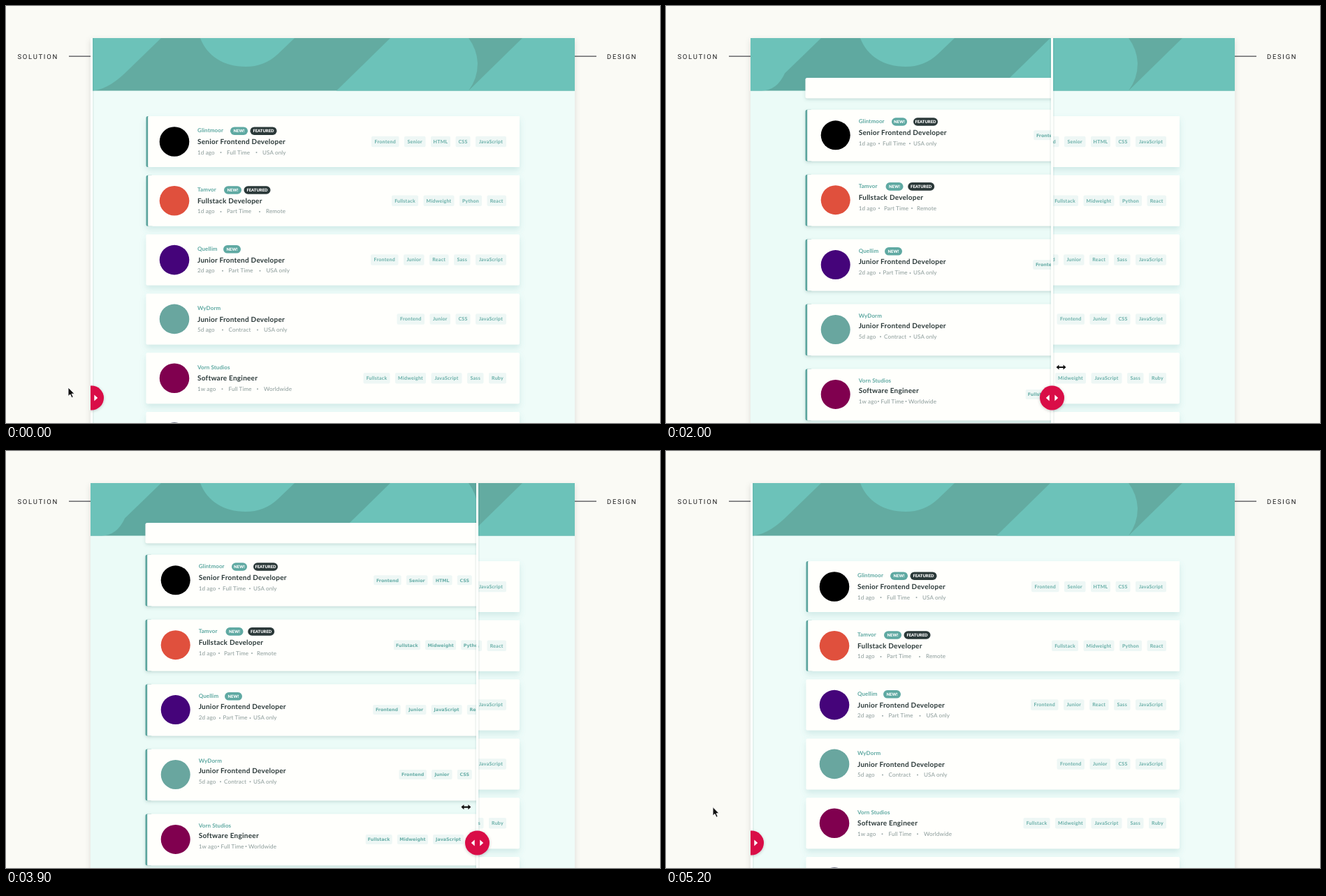
An HTML page for the animation above (6.2 s loop, 936 by 598 pixels).

```html
<!DOCTYPE html>
<html lang="en">
<head>
<meta charset="utf-8">
<title>Solution and design slider</title>
<style>
html, body { margin: 0; width: 100%; height: 100%; overflow: hidden; background: #fafaf5; }
svg { display: block; width: 936px; height: 598px; text-rendering: geometricPrecision; }
text { font-family: Lato, sans-serif; }
.label { font: 9.5px Roboto, sans-serif; letter-spacing: 1.7px; fill: #1d1d1f; }
.name { font-size: 8px; font-weight: 700; letter-spacing: .1px; fill: #5fa9a2; }
.title { font-size: 10px; font-weight: 700; letter-spacing: .25px; fill: #2b3939; }
.meta { font-size: 8.1px; letter-spacing: .12px; fill: #8a9a99; }
.badge { font-size: 5.9px; font-weight: 900; fill: #fff; text-anchor: middle; }
.tag { font-size: 7px; font-weight: 700; letter-spacing: .25px; fill: #68aea7; text-anchor: middle; }
.tag.sys, .clear { font: bold 6.3px "DejaVu Sans", sans-serif; letter-spacing: 0; }
.clear { fill: #7b8383; }
</style>
</head>
<body>
<svg viewBox="0 0 936 598">
  <defs>
    <clipPath id="stage"><rect x="121" y="46" width="693" height="552"/></clipPath>
    <clipPath id="right"><rect id="cut" y="46" width="936" height="552"/></clipPath>
    <filter id="soft" x="-10%" y="-20%" width="120%" height="160%">
      <feDropShadow dx="0" dy="5" stdDeviation="4" flood-color="#5ba4a4" flood-opacity=".2"/>
    </filter>
    <filter id="tight" x="-10%" y="-20%" width="120%" height="160%">
      <feDropShadow dx="0" dy="2" stdDeviation="2" flood-color="#4d7f7c" flood-opacity=".25"/>
    </filter>
    <filter id="halo" x="-20%" y="-20%" width="140%" height="140%">
      <feDropShadow dx="0" dy="1" stdDeviation="2" flood-color="#000" flood-opacity=".22"/>
    </filter>
    <filter id="frame" x="-5%" y="-5%" width="110%" height="110%">
      <feDropShadow dx="0" dy="3" stdDeviation="4" flood-color="#000" flood-opacity=".12"/>
    </filter>
  </defs>
  <rect width="936" height="598" fill="#fafaf5"/>
  <text class="label" x="16.5" y="75.6">SOLUTION</text>
  <text class="label" x="860" y="75.6">DESIGN</text>
  <path d="M90 72.2H121M814 72.2H845" stroke="#4a4a50" stroke-width="1.2"/>
  <rect x="121" y="46" width="693" height="570" fill="#eefbf8" filter="url(#frame)"/>
  <g clip-path="url(#stage)">
    <g id="solution"></g>
    <g clip-path="url(#right)"><g id="design"></g></g>
    <g id="slider">
      <rect x="-3.5" y="46" width="7" height="552" fill="#2c5a56" opacity=".06"/>
      <rect x="-1.5" y="46" width="3" height="552" fill="#fdfffc"/>
      <circle cy="562" r="17.5" fill="#d90d47" filter="url(#halo)"/>
      <path d="M-8.7 562L-3.8 557.4V566.6ZM8.7 562L3.8 557.4V566.6Z" fill="#fff"/>
    </g>
  </g>
  <g id="arrow">
    <path d="M0 0V12.6L2.9 10L5 14.8L7.2 13.8L5.1 9.2H9Z" fill="#111" stroke="#fff" stroke-width=".9" stroke-linejoin="round"/>
  </g>
  <g id="resize">
    <path d="M-7 0L-3 -3.6V-1.1H3V-3.6L7 0L3 3.6V1.1H-3V3.6Z" fill="#111" stroke="#fff" stroke-width=".8" stroke-linejoin="round" paint-order="stroke"/>
  </g>
</svg>
<script>
const $ = id => document.getElementById(id);
const TEAL = '#5fa9a2', DARK = '#2b3939';

const tagWidth = {
  Frontend: 39.5, Fullstack: 38, Senior: 30.5, Junior: 29.5, Midweight: 44, HTML: 28,
  CSS: 21, JavaScript: 44, Python: 32, React: 27.5, Sass: 23.5, Ruby: 25
};

// Meta x lists: dot, text, dot, text
const jobs = [
  { name: 'Glintmoor', title: 'Senior Frontend Developer', logo: '#000', badges: 2,
    meta: ['1d ago', 'Full Time', 'USA only'], tags: 'Frontend Senior HTML CSS JavaScript',
    design: { badge: 321, meta: [307.5, 316, 358.5, 367] },
    solution: { badge: 323, slim: 3, meta: [305, 310, 349, 354] } },
  { name: 'Tamvor', title: 'Fullstack Developer', logo: '#e0503d', badges: 2,
    meta: ['1d ago', 'Part Time', 'Remote'], tags: 'Fullstack Midweight Python React',
    design: { badge: 312, meta: [307.5, 316, 363, 372] },
    solution: { badge: 314.5, meta: [305, 312, 352, 359] } },
  { name: 'Quellim', title: 'Junior Frontend Developer', logo: '#45047a', badges: 1,
    meta: ['2d ago', 'Part Time', 'USA only'], tags: 'Frontend Junior React Sass JavaScript',
    design: { badge: 311, meta: [310, 318.5, 363.5, 372.5] },
    solution: { badge: 313, meta: [306, 310.5, 349.5, 354], tags: 'Frontend Junior JavaScript React Sass' } },
  { name: 'WyDorm', title: 'Junior Frontend Developer', logo: '#69a69f', badges: 0,
    meta: ['5d ago', 'Contract', 'USA only'], tags: 'Frontend Junior CSS JavaScript',
    design: { meta: [310, 318.5, 360, 369] },
    solution: { meta: [307, 312, 349.5, 354] } },
  { name: 'Vorn Studios', title: 'Software Engineer', logo: '#80004f', badges: 0,
    meta: ['1w ago', 'Full Time', 'Worldwide'], tags: 'Fullstack Midweight JavaScript Sass Ruby',
    design: { meta: [309.5, 318.5, 360, 369] },
    solution: { meta: [304, 307.5, 343.5, 347], tags: 'Fullstack Midweight JavaScript Ruby Sass' } }
];

const looks = {
  design: { x: 200.5, y: 158, step: 84.8, w: 534.5, h: 73, textX: 274, name: 23.4, title: 40.2, meta: 54.5,
    logoX: 241, r: 21.3, badgeY: 21.2, newW: 25, featW: 38, gap: 3.5, tagsEnd: 716, tagH: 15.5, tagGap: 7.5,
    shadow: 'soft', bars: 2, lift: 0, tagClass: 'tag' },
  solution: { x: 199.5, y: 148.8, step: 92.9, w: 536, h: 73.8, textX: 275.7, name: 19.6, title: 35.8, meta: 50.8,
    logoX: 242.7, r: 21, badgeY: 17.2, newW: 25, featW: 38, gap: 6.7, tagsEnd: 718, tagH: 14, tagGap: 7.2,
    shadow: 'tight', bars: 5, lift: 1.7, tagClass: 'tag sys' }
};

const rect = (x, y, w, h, fill, r = 0, more = '') =>
  `<rect x="${x}" y="${y}" width="${w}" height="${h}" rx="${r}" fill="${fill}" ${more}/>`;
const text = (cls, x, y, s) => `<text class="${cls}" x="${x}" y="${y}">${s}</text>`;
const disc = (x, y, r, fill) => `<circle cx="${x}" cy="${y}" r="${r}" fill="${fill}"/>`;

function header(dark, corner) {
  return rect(121, 46, 693, 75.5, dark) + `<path fill="#6cc2b9" d="
    M121 46H222L170 96.500Q${corner + 22} 121 ${corner} 121.500H121Z
    M278 46C288 72 312 87 343 87C361 87 376 81 389 69L413 46Z
    M550 46L473 121.500H662Q675 104 675 82Q674 62 662 46Z
    M739 46L662 121.500H814V46Z"/>`;
}

function badge(x, y, w, s, fill) {
  return rect(x, y - 5.8, w, 11.6, fill, 5.8) + text('badge', x + w / 2, y + 2.1, s);
}

function tagRow(list, y, k) {
  let x = k.tagsEnd, out = '';
  for (const tag of list.split(' ').reverse()) {
    const w = tagWidth[tag];
    x -= w;
    out += rect(x, y - k.tagH / 2, w, k.tagH, '#eef7f5', 2) + text(k.tagClass, x + w / 2, y + 2.3, tag);
    x -= k.tagGap;
  }
  return out;
}

function panel(k, y, bar) {
  return `<g filter="url(#${k.shadow})">` + (bar ? rect(k.x, y, 10, k.h, '#5ba49e', 2.5) : '') +
    rect(k.x + (bar ? 2.7 : 0), y, k.w - (bar ? 2.7 : 0), k.h, '#fffffc', bar ? 1 : 2) + '</g>';
}

function card(job, i, kind) {
  const k = looks[kind], own = job[kind], y = k.y + i * k.step, mid = y + 36.5;
  const lift = job.badges ? 0 : k.lift, slim = own.slim || 0;
  const metaY = y + k.meta - lift, [d1, x1, d2, x2] = own.meta;
  let out = panel(k, y, i < k.bars) + disc(k.logoX, mid, k.r, job.logo);
  out += text('name', k.textX, y + k.name, job.name);
  out += text('title', k.textX, y + k.title - lift, job.title);
  [k.textX, x1, x2].forEach((x, n) => out += text('meta', x, metaY, job.meta[n]));
  [d1, d2].forEach(x => out += disc(x, metaY - 2.4, 1, '#9aa8a7'));
  if (job.badges) out += badge(own.badge, y + k.badgeY, k.newW - slim, 'NEW!', TEAL);
  if (job.badges > 1) {
    out += badge(own.badge + k.newW + k.gap + (slim ? .8 - slim / 1.2 : 0) + (slim ? 1 : 0), y + k.badgeY, k.featW - slim, 'FEATURED', DARK);
  }
  return out + tagRow(own.tags || job.tags, mid, k);
}

const cards = kind => jobs.map((job, i) => card(job, i, kind)).join('');

$('solution').innerHTML = rect(121, 46, 693, 552, '#ebfbf7') + header('#5fa9a0', 137) +
  rect(199.5, 103, 536.3, 29.3, '#fffffc', 2.5, 'filter="url(#tight)"') +
  text('clear', 707, 120.4, 'Clear') + cards('solution');

const k = looks.design, lastY = k.y + 5 * k.step;
$('design').innerHTML = rect(121, 46, 693, 552, '#effcf9') + header('#63aba1', 122) +
  cards('design') + panel(k, lastY, false) + disc(k.logoX, lastY + 36.5, k.r, '#3a4058');

// [ms, x] for the divider; [ms, x, y] for the pointer
const dividerPath = [[0, 122.5], [800, 122.5], [900, 140], [1300, 317.5], [2000, 552.5], [2500, 695.7],
  [2700, 744], [3000, 812.5], [3500, 812.5], [4000, 640], [4300, 460], [4700, 187], [4900, 122.5]];
const pointerPath = [[0, 89, 547], [600, 89, 547], [900, 131, 541], [1300, 311.5, 532.5], [2000, 565.5, 518],
  [2500, 700, 510.5], [2700, 759, 509], [3200, 849, 507], [3300, 849, 507], [3400, 825, 507],
  [3500, 808, 509], [4000, 621, 511], [4300, 460, 512], [4700, 176, 512], [5200, 67, 510.5]];

function along(path, t) {
  const n = path.findIndex(p => p[0] > t);
  if (n < 0) return path[path.length - 1].slice(1);
  const a = path[n - 1], b = path[n], f = (t - a[0]) / (b[0] - a[0]);
  return a.slice(1).map((v, i) => v + (b[i + 1] - v) * f);
}

function draw(ms) {
  const t = Math.floor(ms % 6200 / 100) * 100;
  const [x] = along(dividerPath, t), [px, py] = along(pointerPath, t);
  const dragging = t >= 900 && t < 3200 || t >= 3500 && t < 5000;
  $('cut').setAttribute('x', x);
  $('slider').setAttribute('transform', `translate(${x} 0)`);
  for (const id of ['arrow', 'resize']) {
    $(id).setAttribute('transform', `translate(${px} ${py})`);
    $(id).setAttribute('visibility', (id === 'resize') === dragging ? 'visible' : 'hidden');
  }
}

const start = performance.now();
function tick() {
  draw(performance.now() - start);
  requestAnimationFrame(tick);
}
tick();
</script>
</body>
</html>
```
